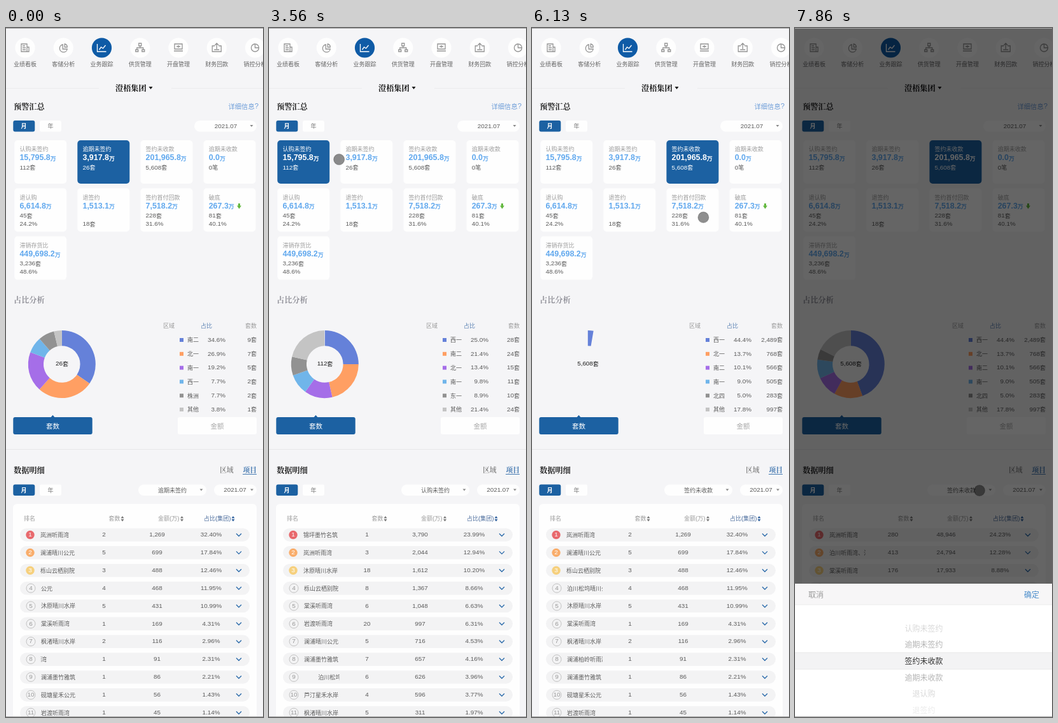
These frames come from a looping animation (404 by 1080 pixels, 8000 ms). An HTML page with a canvas:

```html
<!DOCTYPE html>
<html lang="zh">
<head>
<meta charset="utf-8">
<style>
html, body { margin: 0; width: 100%; height: 100%; overflow: hidden; background: #f5f5f7; }
canvas { display: block; width: 404px; height: 1080px; }
</style>
</head>
<body>
<canvas id="stage"></canvas>
<script>
const W = 404, H = 1080, LOOP = 8000;
const canvas = document.getElementById('stage');
const ratio = window.devicePixelRatio || 1;
canvas.width = W * ratio;
canvas.height = H * ratio;
const ctx = canvas.getContext('2d');

const HAN = '"Noto Sans CJK SC", "Noto Sans CJK", sans-serif';
const LATIN = '"Liberation Sans", Arial, sans-serif';
const SERIF = '"Noto Serif CJK SC", "Noto Sans CJK SC", "Noto Sans CJK", serif';
const BLUE = '#1c61a2', WHITE = '#fefefe', INK = '#5c5c5c', MUTED = '#9c9c9c';

const NAV = [
  ['业绩看板', 'M-6-6H3V6H-6ZM3-1H6V6H-2M-4-3H0M-4 0H1M-4 3H1'],
  ['客储分析', 'M-1-5A6 6 0 1 0 6 2H-1ZM2-6A5 5 0 0 1 6-1H2Z'],
  ['业务跟踪', 'M-7-6V6H7M-4 3L-1-1L2 1L6-4'],
  ['供货管理', 'M-2-7H2V-3H-2ZM0-3V0M-5 3V0H5V3M-7 3H-3V6H-7ZM3 3H7V6H3Z'],
  ['开盘管理', 'M-6-6H6V2H-6ZM-7 5H7M-3-2H3M0-4V0'],
  ['财务回款', 'M-3-3H-7V6H7V-3H3M0 2V-7M-3-4L0-7L3-4M-4 3H4'],
  ['销控分析', 'M0-6A6 6 0 1 0 6 0H0ZM0-6A6 6 0 0 1 6 0']
].map(([label, d]) => ({ label, path: new Path2D(d) }));

const CARDS = [
  ['认购未签约', '15,795.8', '112套'], ['逾期未签约', '3,917.8', '26套'],
  ['签约未收款', '201,965.8', '5,608套'], ['逾期未收款', '0.0', '0笔'],
  ['退认购', '6,614.8', '45套', '24.2%'], ['退签约', '1,513.1', '', '18套'],
  ['签约首付回款', '7,518.2', '228套', '31.6%'], ['破底', '267.3', '81套', '40.1%'],
  ['滞销存货比', '449,698.2', '3,236套', '48.6%']
];

const SLICE_COLORS = ['#6581d9', '#ff9f63', '#a56ee8', '#70b5ea', '#929292', '#c4c4c4'];
const parse = text => text.trim().split('\n').map(line => line.trim().split(' '));

// One entry per card that gets selected: share by region and ranked projects.
const DATA = [
  {
    total: '112套',
    regions: parse(`西一 25.0 28
      南二 21.4 24
      北一 13.4 15
      南一 9.8 11
      东一 8.9 10
      其他 21.4 24`),
    rows: parse(`锦坪墨竹名筑 1 3,790 23.99
      岚洲听雨湾 3 2,044 12.94
      沐原晴川水岸 18 1,612 10.20
      栎山云栖别院 8 1,367 8.66
      棠溪听雨湾 6 1,048 6.63
      岩渡听雨湾 20 997 6.31
      澜浦晴川公元 5 716 4.53
      澜浦墨竹雅筑 7 657 4.16
      泊川松坞晴川公元 6 626 3.96
      芦汀星禾水岸 4 596 3.77
      枫渚晴川水岸 5 311 1.97`)
  },
  {
    total: '26套',
    regions: parse(`南二 34.6 9
      北一 26.9 7
      南一 19.2 5
      西一 7.7 2
      株洲 7.7 2
      其他 3.8 1`),
    rows: parse(`岚洲听雨湾 2 1,269 32.40
      澜浦晴川公元 5 699 17.84
      栎山云栖别院 3 488 12.46
      泊川松坞晴川公元 4 468 11.95
      沐原晴川水岸 5 431 10.99
      棠溪听雨湾 1 169 4.31
      枫渚晴川水岸 2 116 2.96
      澜浦柏岭听雨湾 1 91 2.31
      澜浦墨竹雅筑 1 86 2.21
      砚塘星禾公元 1 56 1.43
      岩渡听雨湾 1 45 1.14`)
  },
  {
    total: '5,608套',
    regions: parse(`西一 44.4 2,489
      北一 13.7 768
      南二 10.1 566
      南一 9.0 505
      北四 5.0 283
      其他 17.8 997`),
    rows: parse(`岚洲听雨湾 280 48,946 24.23
      泊川听雨湾、泊川柏岭 413 24,794 12.28
      棠溪听雨湾 176 17,933 8.88
      栎山云栖别院 135 15,100 7.48
      屿澳墨竹华筑 29 10,331 5.12
      禾丘霞栖别院 143 7,101 3.52
      碧屿晴川公元 76 6,314 3.13
      槐渡十里荷堤 140 6,161 3.05
      泊川松坞晴川公元 86 6,147 3.04
      澜浦晴川公元 71 5,615 2.78
      朔原云栖别院 96 5,188 2.57`)
  }
];

const ORDER = [1, 0, 1, 2];
const CLICKS = [1930, 3960, 5630];
const CHARTS = [2699, 4668, 6122];
const TABLES = [2760, 4700, 6180];
const POINTER = [
  [900, 18, 262], [1630, 69, 224], [3130, 69, 224], [3560, 110, 206],
  [3930, 156, 204], [4830, 156, 204], [5470, 253, 204], [5960, 253, 204],
  [6450, 300, 470], [6760, 316, 722], [6860, 294, 726], [7000, 290, 725]
];

const step = (t, times) => times.filter(time => t >= time).length;
const clamp = v => Math.max(0, Math.min(1, v));
const cubicInOut = p => p < .5 ? 4 * p ** 3 : 1 - (2 - 2 * p) ** 3 / 2;

// Digits are set a little larger than the Chinese text beside them. Returns the width.
function text(str, x, y, color = INK, { size = 9, weight = 300, align = 'left', family = HAN } = {}) {
  const runs = String(str).match(/[\x20-\x7e]+|[^\x20-\x7e]+/g) || [];
  const fonts = runs.map(run => /^[\x20-\x7e]/.test(run)
    ? `${weight} ${size * 1.1}px ${LATIN}` : `${weight} ${size}px ${family}`);
  const widths = runs.map((run, i) => {
    ctx.font = fonts[i];
    return ctx.measureText(run).width;
  });
  const total = widths.reduce((sum, w) => sum + w, 0);
  let left = x - total * { left: 0, center: .5, right: 1 }[align];
  ctx.fillStyle = color;
  runs.forEach((run, i) => {
    ctx.font = fonts[i];
    ctx.fillText(run, left, y);
    left += widths[i];
  });
  return total;
}

const heading = (str, x, y, color = '#1c1c1c', size = 12.2) =>
  text(str, x, y, color, { size, weight: 700, family: SERIF });

function box(x, y, w, h, r, color) {
  ctx.fillStyle = color;
  ctx.beginPath();
  ctx.roundRect(x, y, w, h, r);
  ctx.fill();
}

function disc(x, y, r, color) {
  ctx.fillStyle = color;
  ctx.beginPath();
  ctx.arc(x, y, r, 0, Math.PI * 2);
  ctx.fill();
}

// A negative height points the triangle upwards.
function triangle(x, y, w, h, color) {
  ctx.fillStyle = color;
  ctx.beginPath();
  ctx.moveTo(x - w / 2, y - h / 2);
  ctx.lineTo(x + w / 2, y - h / 2);
  ctx.lineTo(x, y + h / 2);
  ctx.fill();
}

function line(points, color, width = 1) {
  ctx.strokeStyle = color;
  ctx.lineWidth = width;
  ctx.beginPath();
  points.forEach(([x, y]) => ctx.lineTo(x, y));
  ctx.stroke();
}

function drawNav() {
  NAV.forEach(({ label, path }, i) => {
    const x = 30 + i * 60.25, active = i === 2;
    disc(x, 31, 15.6, active ? '#0f5ba6' : WHITE);
    ctx.save();
    ctx.translate(x, 31);
    ctx.strokeStyle = active ? '#fff' : '#949494';
    ctx.lineWidth = 1.3;
    ctx.stroke(path);
    ctx.restore();
    text(label, x, 57, '#666', { align: 'center' });
  });
  line([[0, 94.5], [146, 94.5]], '#ebebed');
  line([[260, 94.5], [W, 94.5]], '#ebebed');
  heading('澄梧集团', 172, 94, '#111');
  triangle(227.5, 94, 6, 4, '#111');
}

function drawPeriod(y) {
  box(11.3, y, 34, 17.5, 3, BLUE);
  text('月', 28, y + 9, '#fff', { weight: 700, align: 'center' });
  box(53, y, 34, 17.5, 3, WHITE);
  text('年', 70, y + 9, '#777', { align: 'center' });
}

function drawSelect(x, y, w, label, labelX, arrowX, open) {
  box(x, y, w, 17.5, 8.7, WHITE);
  text(label, labelX, y + 9, INK, { align: 'center' });
  triangle(arrowX, y + 8.5, 5, open ? -3 : 3, '#888');
}

function drawCards(selected) {
  CARDS.forEach(([title, value, count, share], i) => {
    const x = 13.2 + (i % 4) * 99.1, y = 176 + Math.floor(i / 4) * 75.3;
    const on = i === selected, left = x + 8.2;
    box(x, y, 82, 68, 5, on ? BLUE : WHITE);
    text(title, left, y + 14, on ? '#fff' : MUTED, { weight: on ? 500 : 300 });
    const color = on ? '#fff' : '#62a9ee';
    const width = text(value, left, y + 28, color, { size: 11.3, weight: 700 });
    text('万', left + width, y + 28.5, color, { weight: 700 });
    text(count, left, y + 43, on ? '#fff' : INK);
    if (share) text(share, left, y + 56, INK);
  });
  box(365, 275, 3, 5, 0, '#63b83f');
  triangle(366.5, 281, 7, 5, '#63b83f');
}

function drawDonut(regions, sweep) {
  const cx = 87.8, cy = 527, top = -Math.PI / 2, limit = top + Math.PI * 2 * sweep;
  const sum = regions.reduce((total, region) => total + +region[1], 0);
  let from = top;
  regions.forEach(([, share], i) => {
    const end = from + share / sum * Math.PI * 2, to = Math.min(end, limit);
    if (to > from) {
      ctx.fillStyle = SLICE_COLORS[i];
      ctx.beginPath();
      ctx.arc(cx, cy, 53, from, to);
      ctx.arc(cx, cy, 28.8, to, from, true);
      ctx.fill();
    }
    from = end;
  });
}

function drawShares(t) {
  const n = step(t, CHARTS), { total, regions } = DATA[ORDER[n]];
  const progress = n ? clamp((t - CHARTS[n - 1]) / 1000) : 1;
  heading('占比分析', 12, 426, '#92929a');
  drawDonut(regions, 1 - (1 - progress) ** 3);
  text(total, 88, 526.5, '#222', { weight: 400, align: 'center' });

  text('区域', 247, 467, MUTED);
  text('占比', 315, 467, '#5d83b4', { align: 'center' });
  text('套数', 394, 467, MUTED, { align: 'right' });
  regions.forEach(([name, share, count], i) => {
    const y = 489 + i * 21.8;
    box(273, y - 3, 6, 6, 0, SLICE_COLORS[i]);
    text(name, 285, y);
    text(share + '%', 345, y, INK, { align: 'right' });
    text(count + '套', 394, y, INK, { align: 'right' });
  });

  box(11.3, 610, 124.4, 27, 3, BLUE);
  triangle(73.5, 608.5, 6, -3.5, BLUE);
  text('套数', 73.5, 624, '#fff', { size: 10.5, weight: 400, align: 'center' });
  box(270, 610, 124, 27, 3, WHITE);
  text('金额', 332, 624, '#a8a8a8', { size: 10.5, align: 'center' });
}

function sortMark(x, color) {
  triangle(x, 766.7, 5, -3.4, color);
  triangle(x, 771.7, 5, 3.4, color);
}

function nameX(name, base, t) {
  if (name.length < 7 || t >= TABLES[1]) return base;
  if (t < 1500) return base - 54 - t * .02;
  return 111 - Math.max(0, t - 2400) * .029;
}

function drawRow([name, count, amount, share], i, t) {
  const y = 794.5 + i * 27.87, medal = ['#e8696d', '#f9ad6b', '#f6d07d'][i];
  box(22, y - 10.3, 361, 20.6, 10.3, '#f3f3f4');
  if (medal) {
    disc(38, y, 6.7, medal);
  } else {
    ctx.strokeStyle = '#c2c2c2';
    ctx.lineWidth = 1;
    ctx.beginPath();
    ctx.arc(39, y, 7, 0, Math.PI * 2);
    ctx.stroke();
  }
  text(i + 1, medal ? 38 : 39, y, medal ? '#fff' : '#999', { align: 'center' });
  ctx.save();
  ctx.beginPath();
  ctx.rect(54, y - 8, 57, 16);
  ctx.clip();
  text(name, nameX(name, medal ? 54 : 55, t), y);
  ctx.restore();
  text(count, 154, y, INK, { align: 'center' });
  text(amount, 237.5, y, INK, { align: 'center' });
  text(share + '%', 322.5, y, INK, { align: 'center' });
  line([[362, y - 2], [366, y + 2], [370, y - 2]], '#2d6cab', 1.4);
}

function drawDetails(t, selected) {
  line([[0, 660.5], [W, 660.5]], '#e6e6e9');
  heading('数据明细', 12, 693);
  heading('区域', 336, 692.5, '#8c8c8c', 10.8);
  heading('项目', 372.5, 692.5, '#4579b1', 10.8);
  line([[372, 699.5], [394, 699.5]], '#4579b1');
  drawPeriod(715.5);
  drawSelect(208, 715.5, 107, CARDS[selected][0], 261.5, 307, t >= 7460 && t < 7740);
  drawSelect(327, 715.5, 67, '2021.07', 360, 386.5);

  box(11, 746, 383, 360, 6, WHITE);
  text('排名', 28, 769, MUTED);
  text('套数', 161.5, 769, MUTED);
  text('金额(万)', 239, 769, MUTED);
  text('占比(集团)', 311, 769, '#4b6c9c');
  sortMark(183, '#777');
  sortMark(276.5, '#777');
  sortMark(357, '#2d5f9c');
  DATA[ORDER[step(t, TABLES)]].rows.forEach((row, i) => drawRow(row, i, t));
}

function drawPointer(t) {
  if (t < POINTER[0][0]) return;
  let [, x, y] = POINTER[POINTER.length - 1];
  const next = POINTER.findIndex(key => key[0] > t);
  if (next > 0) {
    const [t0, x0, y0] = POINTER[next - 1], [t1, x1, y1] = POINTER[next];
    const p = (t - t0) / (t1 - t0);
    x = x0 + (x1 - x0) * p;
    y = y0 + (y1 - y0) * p;
  }
  disc(x, y, 8.5, 'rgba(0,0,0,.44)');
  ctx.strokeStyle = 'rgba(0,0,0,.2)';
  ctx.lineWidth = 1.2;
  ctx.stroke();
}

function drawSheet(t) {
  const p = cubicInOut(clamp((t - 7460) / 400));
  if (!p) return;
  ctx.fillStyle = `rgba(0,0,0,${.6 * p})`;
  ctx.fillRect(0, 0, W, H);
  const top = H - 209 * p;
  box(0, top, W, 210, 0, '#fff');
  box(0, top, W, 33, 0, '#f7f6f7');
  line([[0, top + 33], [W, top + 33]], '#ebebeb');
  text('取消', 21, top + 17, '#9a9a9a', { size: 12 });
  text('确定', 360, top + 17, '#4a8dcb', { size: 12, weight: 400 });
  box(0, top + 108, W, 26, 0, '#f3f3f4');
  line([[0, top + 108], [W, top + 108]], '#e8e8e8');
  line([[0, top + 134], [W, top + 134]], '#e8e8e8');
  const shades = ['#d8d8d8', '#b4b4b4', '#333', '#b4b4b4', '#d8d8d8', '#ebebeb'];
  shades.forEach((shade, i) =>
    text(CARDS[i][0], 202.5, top + 70 + i * 25.7, shade, { size: 12, align: 'center' }));
}

function draw(t) {
  ctx.setTransform(ratio, 0, 0, ratio, 0, 0);
  ctx.textBaseline = 'middle';
  ctx.fillStyle = '#f5f5f7';
  ctx.fillRect(0, 0, W, H);
  const selected = ORDER[step(t, CLICKS)];
  drawNav();
  heading('预警汇总', 12, 123);
  text('详细信息?', 397, 123, '#6c9cd8', { size: 10.3, align: 'right' });
  drawPeriod(145);
  drawSelect(296, 145, 98, '2021.07', 345.5, 386);
  drawCards(selected);
  drawShares(t);
  drawDetails(t, selected);
  drawPointer(t);
  drawSheet(t);
  box(0, 0, W, 1, 0, '#a6a6a6');
  box(0, H - 1, W, 1, 0, '#a6a6a6');
}

const start = performance.now();
function frame() {
  draw((performance.now() - start) % LOOP);
  requestAnimationFrame(frame);
}
frame();
</script>
</body>
</html>
```
